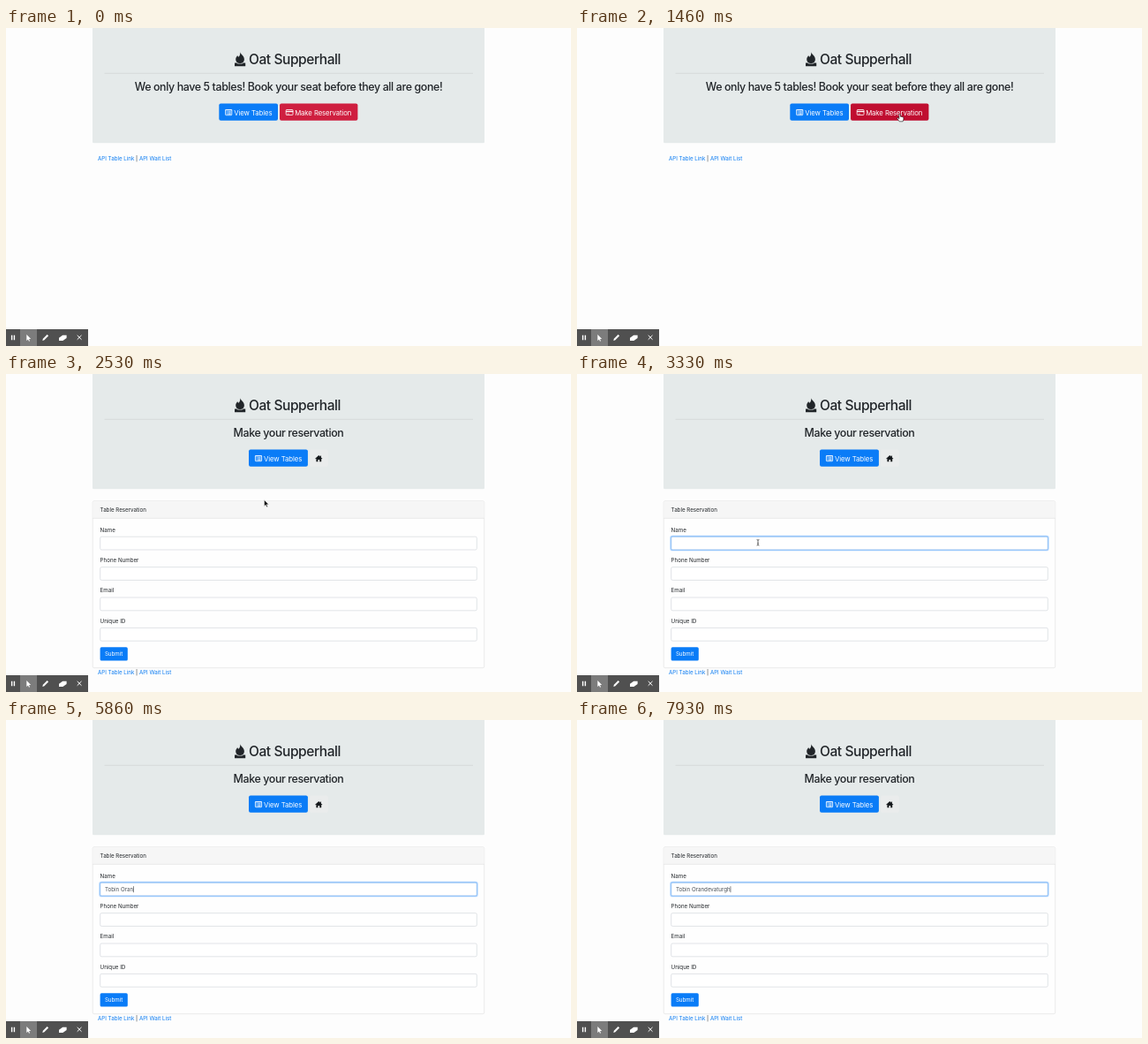
Recreate the animation shown at these times as an HTML page. Size 640 by 360 pixels, loop 8 s.

```html
<!DOCTYPE html>
<html lang="en">
<head>
<meta charset="utf-8">
<title>Table reservation</title>
<style>
  html, body { margin: 0; width: 100%; height: 100%; overflow: hidden; background: #fdfdfd; }
  svg { display: block; width: 640px; height: 360px; }
  text { font-family: Inter, Roboto, sans-serif; font-size: 6.2px; fill: #212529; white-space: pre; }
  .title { font-size: 15.5px; font-weight: 500; letter-spacing: -.027em; }
  .lead { font-size: 12.4px; font-weight: 500; letter-spacing: -.03em; text-anchor: middle; }
  .btn { font-size: 7.75px; letter-spacing: -.011em; fill: #fff; }
  .light { fill: #fff; }
  .link { fill: #0a7bf2; }
  .blue { fill: #0a7cf7; }
  .typed { fill: #495057; }
  .field { fill: #fff; stroke: #cdd2d7; stroke-width: .6; }
  .line { fill: none; stroke: #fff; stroke-width: .8; }
</style>
</head>
<body>
<svg viewBox="0 0 640 360">
  <defs>
    <g id="list">
      <rect x=".4" y=".4" width="7.2" height="6.2" rx=".7" class="line"/>
      <path d="M0 .8H8M1.5 2.7H2.5M3.2 2.7H6.6M1.5 4H2.5M3.2 4H6.6M1.5 5.3H2.5M3.2 5.3H6.6" class="line"/>
    </g>
    <g id="links">
      <text class="link" x="104">API Table Link<tspan fill="#212529"> | </tspan>API Wait List</text>
    </g>
  </defs>

  <rect x="98" y="-4" width="444" height="134.2" rx="1.5" fill="#e5eaea"/>
  <path d="M111.5 51.3H529" stroke="#d0d5d5" stroke-width=".7"/>
  <g fill="#212529">
    <path d="M259 39.6h2.4l1 1h5.2l1-1h2.6v3.6h-12.2z"/>
    <path d="M265.3 27.2c.4 2.7 4.6 4.2 4.6 8.2 0 2.700-1.600 4.600-4.800 4.600s-4.900-1.900-4.900-4.500c0-2.100 1.300-3.300 2-4.500.4 1 .7 1.500 1.300 1.800 1.300-1.500 1.900-3.100 1.800-5.600z"/>
  </g>
  <text class="title" x="275" y="41.100">Oat Supperhall</text>

  <g id="home">
    <text class="lead" x="320" y="70.500">We only have 5 tables! Book your seat before they all are gone!</text>
    <rect class="blue" x="241.300" y="85.600" width="66.700" height="19.200" rx="2"/>
    <use href="#list" x="248.200" y="92.100"/>
    <text class="btn" x="258.200" y="98.600">View Tables</text>
    <rect id="ring" x="309.400" y="85" width="89.600" height="20.400" rx="2.500" fill="none" stroke="#dc3545" stroke-width="1.300"/>
    <rect id="book" x="310" y="85.600" width="88.400" height="19.200" rx="2"/>
    <rect x="317.200" y="92.500" width="7.800" height="6" rx=".7" class="line"/>
    <path d="M317 94.500H325.200" class="line" style="stroke-width:1.300"/>
    <path d="M318.300 97.100H321" class="line" style="stroke-width:.6"/>
    <text class="btn" x="327.200" y="98.600">Make Reservation</text>
    <use href="#links" y="150.300"/>
  </g>

  <g id="form">
    <text class="lead" x="320" y="70.500">Make your reservation</text>
    <rect class="blue" x="275" y="85.600" width="66.900" height="19.200" rx="2"/>
    <use href="#list" x="282" y="92.100"/>
    <text class="btn" x="292" y="98.600">View Tables</text>
    <rect x="344" y="85.600" width="20.800" height="19.200" rx="2" fill="#eaecec"/>
    <path d="M354.300 92.100l1.600 1.400v-.9h1v1.800l1.500 1.300-.5.600-.7-.5v3.400h-2v-2.300h-1.800v2.300h-2v-3.400l-.7.500-.5-.6z" fill="#16191c"/>
    <rect x="98.200" y="143.700" width="443.500" height="189" rx="1.600" fill="#fefefe" stroke="#dedede" stroke-width=".6"/>
    <path d="M98.500 163.300V145q0-1 1-1H540.500q1 0 1 1V163.300z" fill="#f6f6f6"/>
    <path d="M98.200 163.300H541.700" stroke="#dcdcdc" stroke-width=".6"/>
    <text x="106.600" y="155.600">Table Reservation</text>
    <g id="fields"></g>
    <rect id="glow" x="106" y="183.500" width="428" height="16.200" rx="2.200" fill="none" stroke="#007bff" stroke-opacity=".32" stroke-width="1.300"/>
    <rect id="edge" x="106.700" y="184.200" width="426.600" height="14.800" rx="1.600" fill="none" stroke="#80bdff" stroke-width=".6"/>
    <text id="name" class="typed" x="112" y="193.900"></text>
    <rect id="caret" y="188.200" width=".6" height="7" fill="#33383d"/>
    <rect class="blue" x="106.600" y="309.300" width="31.200" height="15.200" rx="1.600"/>
    <text class="light" x="111.900" y="319.100">Submit</text>
    <use href="#links" y="340.100"/>
  </g>

  <g id="bar">
    <rect y="341" width="93" height="19" fill="#505050"/>
    <rect x="16" y="341" width="19" height="19" fill="#7c7c7c"/>
    <path d="M6.600 347.700v5.600M9.400 347.700v5.600" stroke="#fff" stroke-width="1.400"/>
    <path d="M23.300 346.900v7l1.700-1.500 1 2.300 1-.5-1-2.200h2.200z" fill="#fff"/>
    <path d="M41.300 353.900l.6-2.100 4.700-4.700 1.500 1.500-4.700 4.700z" fill="#fff"/>
    <path d="M60 354v-3.200l4.200-3h4.400v3.100l-4.200 3.100z" fill="#fff"/>
    <path d="M80.700 347.900l4.800 4.800M85.500 347.900l-4.800 4.800" stroke="#fff" stroke-width="1"/>
  </g>

  <g id="pointer">
    <path id="arrow" d="M0 0v7.200l1.700-1.500 1.100 2.500 1.200-.5-1.100-2.500h2.300z" fill="#111" stroke="#fff" stroke-width=".5"/>
    <path id="hand" d="M-.8.700q.7-1.200 1.500 0v2.500q.8-.6 1.300.2.800-.4 1.200.4 1-.3 1.100.7v1.700l-.8 2.500h-4l-2.400-3.300q-.2-1.200 1-.8l1.100 1z" fill="#fff" stroke="#111" stroke-width=".6"/>
    <path id="beam" d="M-1.400-3.300q1.400 0 1.400 1v4.600q0 1-1.400 1M1.400-3.300q-1.400 0-1.400 1M0 2.300q0 1 1.400 1M-.7.900h1.400" fill="none" stroke="#222" stroke-width=".65"/>
  </g>
</svg>
<script>
const LOOP = 8000, OPEN = 2000, FOCUS = 2800, BLINK = 530;
const $ = id => document.getElementById(id);
const clamp = v => Math.max(0, Math.min(1, v));
const fade = (t, start) => {
  const p = clamp((t - start) / 150);
  return p * p * (3 - 2 * p);
};
const show = (id, on) => $(id).setAttribute('visibility', on ? 'inherit' : 'hidden');

const labels = ['Name', 'Phone Number', 'Email', 'Unique ID'];
$('fields').innerHTML = labels.map((label, i) => {
  const y = 178.5 + i * 34.4;
  return `<text x="106.6" y="${y}">${label}</text>
    <rect class="field" x="106.7" y="${y + 5.7}" width="426.6" height="14.8" rx="1.6"/>`;
}).join('');

// Pointer stops: time, x, y
const path = [
  [60, 458, 161], [200, 441, 148], [330, 415, 128], [460, 394, 110],
  [600, 381, 102.500], [800, 377, 101.300], [870, 377, 101.300], [1060, 366, 97.500],
  [1260, 366, 97.500], [1800, 365, 96.500], [2330, 365, 96.500], [2470, 330, 120],
  [2600, 250, 168], [2730, 205, 190.800]
];
// Keystrokes, with one slip that is taken back
const keys = [
  [3930, 'T'], [4130, 'o'], [4260, 'b'], [4400, 'i'], [4530, 'n'], [4660, ' '], [4860, 'O'],
  [5130, 'r'], [5400, 'a'], [5660, 'n'], [6060, 'd'], [6530, 't'], [7000, '<'],
  [7070, 'e'], [7200, 'v'], [7330, 'a'], [7460, 't'], [7600, 'u'], [7730, 'r'], [7800, 'g'], [7930, 'h']
];

function pointerAt(t) {
  const i = path.findIndex(p => p[0] > t);
  if (i < 0) return path[path.length - 1].slice(1);
  if (i === 0) return path[0].slice(1);
  const [a, b] = [path[i - 1], path[i]];
  const p = (t - a[0]) / (b[0] - a[0]);
  return [a[1] + (b[1] - a[1]) * p, a[2] + (b[2] - a[2]) * p];
}

function bookColor(t) {
  const hover = fade(t, 530), press = fade(t, 1730);
  const mix = (a, b, c) => a + (b - a) * hover + (c - b) * press;
  return `rgb(${mix(207, 192, 176)},${mix(31, 14, 13)},${mix(64, 48, 42)})`;
}

function drawPointer(t) {
  const [x, y] = pointerAt(t);
  const onBook = t < OPEN && x < 398 && y < 105;
  const onField = t >= OPEN && y > 184;
  show('pointer', t >= 60 && t < keys[0][0]);
  $('pointer').setAttribute('transform', `translate(${x} ${y})`);
  show('hand', onBook);
  show('beam', onField);
  show('arrow', !onBook && !onField);
}

function drawName(t) {
  let value = '', last = FOCUS;
  for (const [time, key] of keys) {
    if (time > t) break;
    value = key === '<' ? value.slice(0, -1) : value + key;
    last = time;
  }
  const name = $('name');
  if (name.textContent !== value) name.textContent = value;
  const width = value ? name.getComputedTextLength() : 0;
  $('caret').setAttribute('x', 112 + width);
  show('caret', t >= FOCUS && (t - last) % (2 * BLINK) < BLINK);
}

function draw(t) {
  show('home', t < OPEN);
  show('form', t >= OPEN);
  $('book').setAttribute('fill', bookColor(t));
  $('ring').setAttribute('opacity', .6 * fade(t, 1730));
  const focus = fade(t, FOCUS);
  $('glow').setAttribute('opacity', focus);
  $('edge').setAttribute('opacity', focus);
  if (t >= OPEN) drawName(t);
  else show('caret', false);
  drawPointer(t);
}

const begin = performance.now();
function tick() {
  draw((performance.now() - begin) % LOOP);
  requestAnimationFrame(tick);
}
tick();
</script>
</body>
</html>
```
